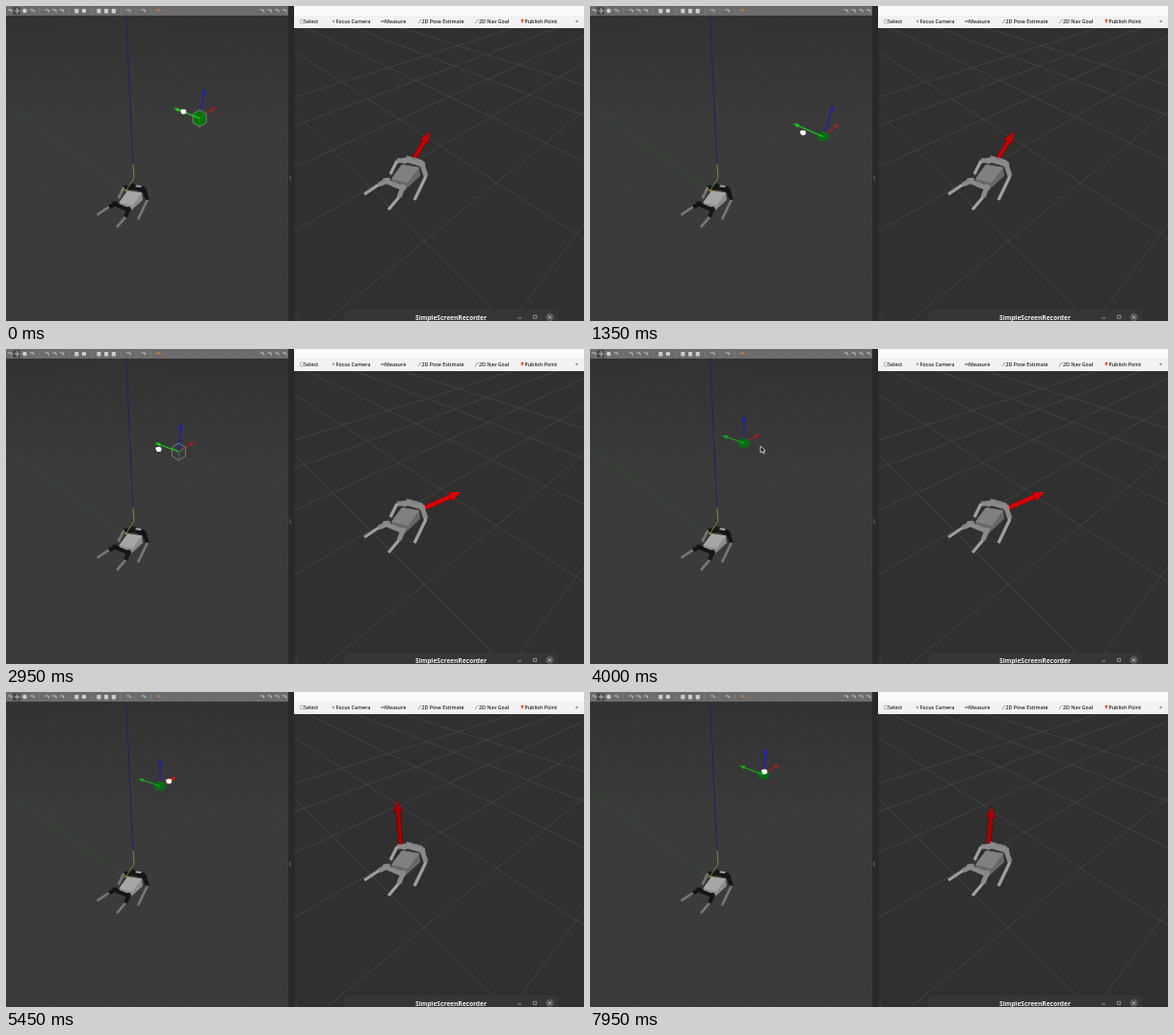
An HTML page with a canvas for the animation above (8000 ms loop, 600 by 328 pixels).

```html
<!DOCTYPE html>
<html lang="en">
<head>
<meta charset="utf-8">
<title>Robot simulation</title>
<style>
html, body { margin: 0; width: 100%; height: 100%; overflow: hidden; background: #303030; }
canvas { display: block; width: 600px; height: 328px; }
</style>
</head>
<body>
<canvas id="stage"></canvas>
<script>
const LOOP = 8000;
const HEIGHT = 328;
const canvas = document.getElementById('stage');
const scale = window.devicePixelRatio || 1;
canvas.width = 600 * scale;
canvas.height = HEIGHT * scale;
const c = canvas.getContext('2d');

// Each move: start time, end time, shift in x and y
const boxMoves = [[0, 1300, 41, 19], [1500, 3400, -82, -38], [5650, 6600, 20, -12]];
const cursorMoves = [
  [0, 1300, -4, 3], [1500, 3400, 0, 2], [3400, 3850, 38, 5],
  [4200, 4900, -8, -8], [5650, 6600, 12, 6], [6900, 7500, -20, -4]
];
const goals = [
  { from: 0, tail: [423, 160], tip: [440, 131] },
  { from: 1650, tail: [431, 167], tip: [472, 149] },
  { from: 5200, tail: [410, 161], tip: [406, 113] },
  { from: 7700, tail: [414, 158], tip: [417, 119] }
];

function travel(x, y, moves, t) {
  for (const [start, end, dx, dy] of moves) {
    const p = Math.min(1, Math.max(0, (t - start) / (end - start)));
    x += dx * p;
    y += dy * p;
  }
  return [x, y];
}

function rect(x, y, w, h, color) {
  c.fillStyle = color;
  c.fillRect(x, y, w, h);
}

function frame(x, y, w, h, color) {
  c.strokeStyle = color;
  c.lineWidth = 0.6;
  c.strokeRect(x, y, w, h);
}

function trace(points) {
  c.beginPath();
  points.forEach(([x, y]) => c.lineTo(x, y));
}

function line(points, color, width = 1) {
  trace(points);
  c.strokeStyle = color;
  c.lineWidth = width;
  c.stroke();
}

function poly(points, color) {
  trace(points);
  c.fillStyle = color;
  c.fill();
}

function disc(x, y, r, color, ry = r) {
  c.beginPath();
  c.ellipse(x, y, r, ry, 0, 0, 2 * Math.PI);
  c.fillStyle = color;
  c.fill();
}

function rounded(x, y, w, h, r, color) {
  c.beginPath();
  c.roundRect(x, y, w, h, r);
  c.fillStyle = color;
  c.fill();
}

function text(label, x, y, color, font, align = 'left') {
  c.font = font;
  c.textAlign = align;
  c.fillStyle = color;
  c.fillText(label, x, y);
}

function arrow([x, y], [tipX, tipY], color, width, headLength, headWidth) {
  const length = Math.hypot(tipX - x, tipY - y);
  const neck = length - headLength;
  c.save();
  c.translate(x, y);
  c.rotate(Math.atan2(tipY - y, tipX - x));
  line([[0, 0], [neck, 0]], color, width);
  poly([[length, 0], [neck, -headWidth], [neck, headWidth]], color);
  c.restore();
}

function clipped(x, y, w, h, draw) {
  c.save();
  c.beginPath();
  c.rect(x, y, w, h);
  c.clip();
  draw();
  c.restore();
}

// Parallel ground lines: they share a vanishing point and are evenly spaced at the bottom edge
function groundLines(vanishX, horizon, firstX, step, count, color) {
  for (let i = 0; i < count; i++) line([[vanishX, horizon], [firstX + i * step, HEIGHT]], color, 0.7);
}

function drawSimulator() {
  const shade = c.createLinearGradient(0, 10, 0, 130);
  shade.addColorStop(0, '#323232');
  shade.addColorStop(1, '#3b3b3b');
  rect(0, 10, 293, 318, shade);
  groundLines(-251, -82, -52, 60, 24, '#ffffff05');
  groundLines(487, -82, -1154, 60, 24, '#ffffff05');
  line([[0, 102], [124, 193]], '#265a26', 0.8);
  line([[293, 64], [145, 167]], '#4c2c2e', 0.7);
  line([[124.7, 10], [131.8, 165]], '#20206c');
}

function drawViewer() {
  rect(300, 23, 300, 305, '#303030');
  groundLines(119, -70, 303, 214, 6, '#494949');
  groundLines(820, -70, -435, 192, 6, '#494949');
}

function drawRobot({ body, top, thigh, shin }) {
  const leg = (hip, knee, foot) => {
    line([hip, knee], thigh, 5);
    line([knee, foot], shin, 3.2);
    disc(...hip, 3.2, thigh);
  };
  leg([414, 161], [406, 161], [399, 175]);
  leg([432, 165], [436, 177], [424, 202]);
  line([[415, 159], [432, 164]], thigh, 7);
  line([[421, 159], [428, 160]], top, 2.5);
  poly([[400, 180], [411, 165], [429, 168], [430, 177], [416, 190], [402, 187]], body);
  poly([[400, 180], [411, 165], [429, 168], [417, 184]], top);
  leg([396, 182], [387, 186], [372, 196]);
  leg([412, 189], [408, 199], [397, 212]);
  line([[391, 181], [410, 189]], thigh, 5);
}

function drawSimulatorRobot() {
  c.save();
  c.translate(93, 184);
  c.scale(0.815, 0.815);
  c.translate(-370, -155);
  drawRobot({ body: '#8d8d8d', top: '#a6a6a6', thigh: '#151515', shin: '#777' });
  c.restore();
  line([[132, 165], [133, 179], [124, 193]], '#96945c', 0.8);
  line([[123, 191], [128, 194]], '#c5ad2c', 0.8);
}

function drawBox(x, y, filled) {
  const corner = i => [x + 8 * Math.sin(i * Math.PI / 3), y - 9 * Math.cos(i * Math.PI / 3)];
  const outline = [0, 1, 2, 3, 4, 5, 0].map(corner);
  if (filled) poly(outline, '#087208');
  line(outline, '#929b92', 0.7);
  [1, 3, 5].forEach(i => line([[x, y], corner(i)], '#3f8a43', 0.7));
}

function drawGizmo(t) {
  const [x, y] = travel(201, 117, boxMoves, t);
  const side = x - 160;
  const active = t < 3400 ? 'green' : t > 4900 && t < 7000 ? 'red' : t >= 7000 ? 'blue' : '';
  const axis = (name, dx, dy, bright, dim) =>
    arrow([x, y], [x + dx, y + dy], name === active ? bright : dim, 1.2, 6, 1.9);
  const boxed = t < 900 || (t > 2200 && t < 3400) || (t > 5800 && t < 7300);

  axis('red', 17, -10 - side * 0.05, '#e01818', '#a91f1f');
  axis('blue', side * 0.13, -29 - (y - 98) * 0.1, '#1a1af0', '#1c1cc8');
  if (boxed) drawBox(x, y, t < 900);
  else disc(x, y, 6, '#096b14', 5);
  axis('green', -23 - side * 0.1, -8 - side * 0.07, '#16d51a', '#14b018');
}

function drawCursor(t) {
  const [boxX, boxY] = travel(201, 117, boxMoves, t);
  const [x, y] = travel(boxX - 17, boxY - 7, cursorMoves, t);
  if (t > 3430 && t < 4700) {
    const pointer = [[0, 0], [0, 7], [1.7, 5.5], [3, 8], [4.2, 7.4], [3, 5], [5, 5], [0, 0]]
      .map(([dx, dy]) => [x + dx, y + dy]);
    poly(pointer, '#111');
    line(pointer, '#eee', 0.8);
  } else {
    rounded(x - 2.5, y - 2.5, 5.5, 5, 2, '#fff');
    line([[x - 1, y - 1.5], [x - 3, y - 1]], '#fff', 1.6);
  }
}

function drawGoal(t) {
  const { tail, tip } = goals.findLast(goal => goal.from <= t);
  const facing = Math.cos(Math.atan2(tip[1] - tail[1], tip[0] - tail[0]));
  const red = 165 + 60 * Math.max(0, facing);
  arrow(tail, tip, `rgb(${red * 0.75} 0 0)`, 5, 12, 5.3);
  arrow(tail, tip, `rgb(${red} 0 0)`, 3.2, 11, 4);
}

function drawSimulatorToolbar() {
  rect(0, 0, 293, 10, '#6c6c6c');
  rect(7, 1, 8, 8, '#4b4b4b');
  const separators = [4, 8, 11, 15, 17, 19];
  for (let i = 0; i <= 37; i++) {
    const x = 4 + i * 7.7;
    const color = i === 20 ? '#df8a35' : '#cfcfcf';
    if (i > 20 && i < 34) continue;
    if (separators.includes(i)) line([[x, 2], [x, 8]], '#858585', 0.6);
    else if (i === 1) {
      line([[x - 3, 5], [x + 3, 5]], color, 0.8);
      line([[x, 2], [x, 8]], color, 0.8);
    } else if (i === 2 || i === 10) disc(x, 5, 2.3, color);
    else if (i > 8 && i < 16) rect(x - 2, 3, 4, 4.5, color);
    else line([[x - 2, 4], [x + 1.5, 4], [x + 2, 6.5]], color, 0.9);
  }
  rect(293, 0, 7, HEIGHT, '#292929');
  line([[295, 177], [295, 182]], '#777', 0.8);
}

function drawViewerToolbar() {
  rect(299, 0, 301, 10, '#fafafa');
  rect(299, 10, 301, 13, '#f2f2f2');
  const labels = {
    'Select': 309, 'Focus Camera': 342.5, 'Measure': 393,
    '2D Pose Estimate': 431.5, '2D Nav Goal': 491, 'Publish Point': 538.5
  };
  for (const [label, x] of Object.entries(labels)) {
    text(label, x, 18, '#222', '600 5.3px "Open Sans", sans-serif');
  }
  frame(305.5, 14, 3, 4, '#999');
  disc(340, 16, 1.4, '#aaa');
  line([[389, 16], [393, 16]], '#777', 1.4);
  line([[428, 18], [431, 14]], '#58a458', 0.8);
  line([[487, 18], [490, 14]], '#a36e9e', 0.8);
  disc(536, 15, 1.5, '#e25a21');
  line([[536, 15], [536, 18]], '#e25a21', 0.8);
  disc(592.5, 16, 1.3, '#999');
}

function drawTitleBar() {
  rounded(351, 316, 222, 16, [4, 4, 0, 0], '#363636');
  text('SimpleScreenRecorder', 462, 326.5, '#f4f4f4', 'bold 6.6px "Open Sans", sans-serif', 'center');
  line([[531.5, 325], [535, 325]], '#ccc', 0.7);
  frame(547.5, 322.2, 3.2, 3.2, '#ccc');
  disc(564.5, 324, 4.3, '#555');
  line([[563, 322.5], [566, 325.5]], '#eee', 0.7);
  line([[566, 322.5], [563, 325.5]], '#eee', 0.7);
}

function render(now) {
  const t = now % LOOP;
  c.setTransform(scale, 0, 0, scale, 0, 0);
  c.lineJoin = 'round';
  clipped(0, 10, 293, 318, () => {
    drawSimulator();
    drawSimulatorRobot();
    drawGizmo(t);
    drawCursor(t);
  });
  clipped(300, 23, 300, 305, () => {
    drawViewer();
    drawGoal(t);
    drawRobot({ body: '#686868', top: '#808080', thigh: '#8a8a8a', shin: '#a0a0a0' });
  });
  drawSimulatorToolbar();
  drawViewerToolbar();
  drawTitleBar();
}

const start = performance.now();
function tick() {
  render(performance.now() - start);
  requestAnimationFrame(tick);
}
tick();
</script>
</body>
</html>
```
